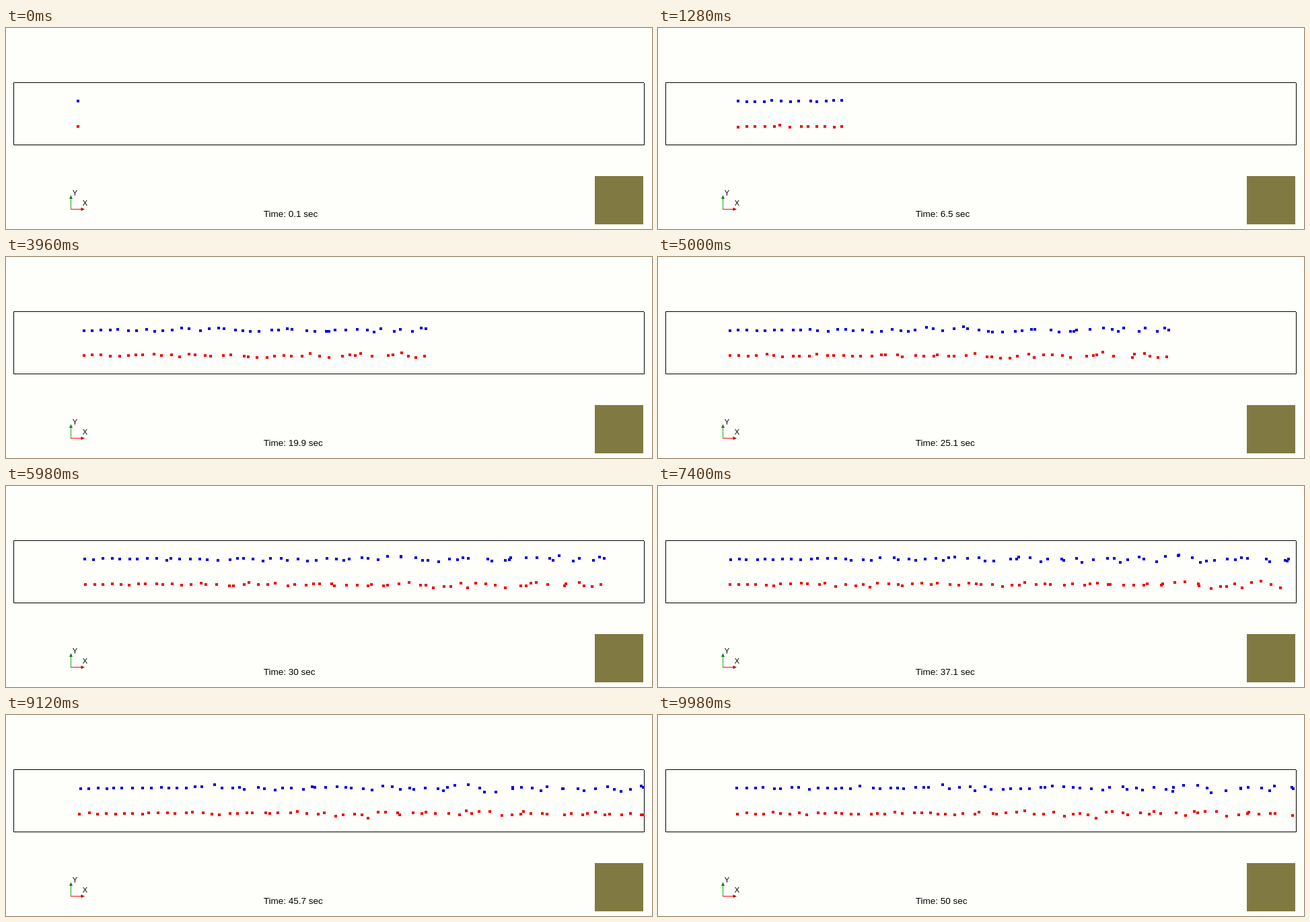
Write an HTML page that moves like this. It is 960x300 px and loops after 10000 ms.

```html
<!DOCTYPE html>
<html lang="en">
<head>
<meta charset="utf-8">
<title>Particle drift</title>
<style>
  html, body { margin: 0; width: 100%; height: 100%; overflow: hidden; background: #fefefb; }
  svg { display: block; width: 960px; height: 300px; }
  text { font-family: "Liberation Sans", Arial, sans-serif; fill: #000; white-space: pre; }
</style>
</head>
<body>
<svg viewBox="0 0 960 300">
  <rect width="960" height="300" fill="#fefefb"/>
  <path d="M948 81.5H11.5V174.5H948.5V82" fill="none" stroke="#000"/>

  <g shape-rendering="crispEdges">
    <path id="blue" fill="#0000dc"/>
    <path id="red" fill="#f00000"/>
  </g>

  <path d="M96.5 270V254" stroke="#18b018"/>
  <path d="M94 255L96.5 249.5L99 255Z" fill="#108010"/>
  <path d="M96 270.5H112" stroke="#f01010"/>
  <path d="M111.5 268L117 270.5L111.5 273Z" fill="#b80808"/>
  <text x="98.7" y="250" font-size="11">Y</text>
  <text x="113.7" y="265" font-size="11">X</text>

  <text id="clock" x="382.7" y="282" font-size="13.5">Time: 0.1 sec</text>
  <rect x="875" y="221" width="72" height="72" fill="#807a42"/>
</svg>
<script>
  const LOOP = 10000, FRAME = 20, STEPS = LOOP / FRAME;
  const GAP = 5;               // steps between releases
  const START = 107.4, END = 948;
  const SEED_X = 1.2, SEED_Y = 0.7;
  const SPREAD_X = 0.27, SPREAD_Y = 0.15;

  function makeRandom(seed) {
    return () => {
      seed = (seed + 0x6D2B79F5) | 0;
      let r = Math.imul(seed ^ (seed >>> 15), 1 | seed);
      r ^= r + Math.imul(r ^ (r >>> 7), 61 | r);
      return ((r ^ (r >>> 14)) >>> 0) / 4294967296;
    };
  }

  // Each particle starts near the inlet, drifts downstream and diffuses as a random walk.
  function makeWalk(y, speed, random) {
    const even = () => 2 * random() - 1;
    const gauss = () => even() + even() + even();
    const walk = [];
    let x = START + SEED_X * even();
    y += SEED_Y * even();
    while (x <= END && walk.length < STEPS) {
      walk.push([x, y]);
      x += speed + SPREAD_X * gauss();
      y += SPREAD_Y * gauss();
    }
    return walk;
  }

  function makeRow(y, speed, seed) {
    const random = makeRandom(seed);
    return Array.from({ length: STEPS / GAP }, () => makeWalk(y, speed, random));
  }

  const blueRow = makeRow(109.2, 2.63, 11);
  const redRow = makeRow(147, 2.6, 29);

  const blue = document.getElementById("blue");
  const red = document.getElementById("red");
  const clock = document.getElementById("clock");

  function rowPath(row, step) {
    let d = "";
    row.forEach((walk, i) => {
      const p = walk[step - i * GAP];
      if (p) d += `M${Math.round(p[0]) - 2} ${Math.round(p[1]) - 2}h4v4h-4z`;
    });
    return d;
  }

  let shown = -1;
  function draw(ms) {
    const step = Math.floor((ms % LOOP) / FRAME);
    if (step === shown) return;
    shown = step;
    blue.setAttribute("d", rowPath(blueRow, step));
    red.setAttribute("d", rowPath(redRow, step));
    clock.textContent = `Time: ${(step + 1) / 10} sec`;
  }

  const begin = performance.now();
  function tick() {
    draw(performance.now() - begin);
    requestAnimationFrame(tick);
  }
  tick();
</script>
</body>
</html>
```
